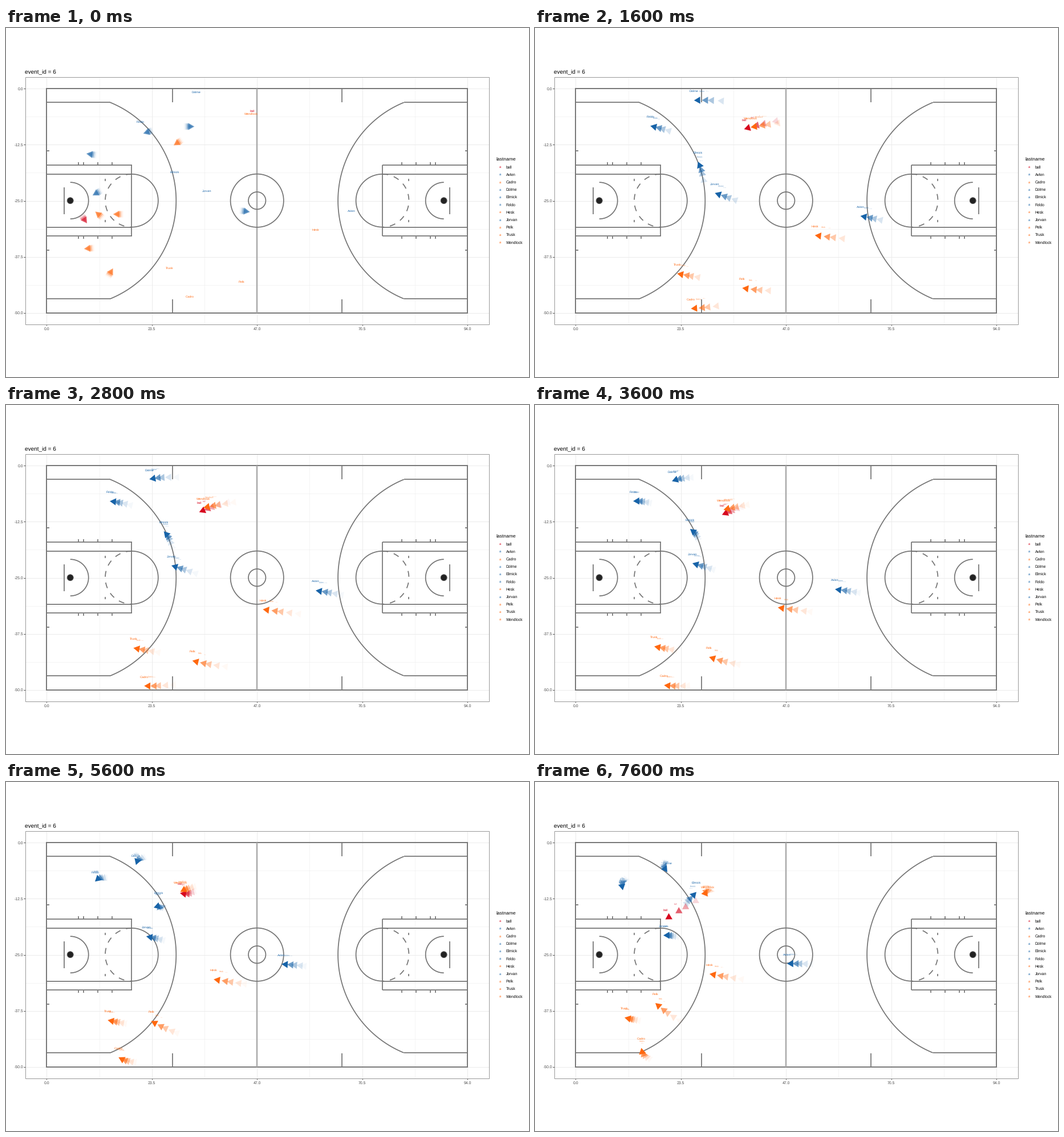
These frames come from a looping animation (917 px wide and 611 px high, 8 s). A matplotlib script:

```python
import numpy as np
import matplotlib.pyplot as plt
from matplotlib.animation import FuncAnimation
from matplotlib.collections import PolyCollection
from matplotlib.colors import to_rgba
from matplotlib.patches import Arc, Circle, Rectangle

W, H, DPI = 917, 611, 100
FRAMES, INTERVAL, WAKE = 20, 400, 4
RED, BLUE, ORANGE = "#d7081f", "#1763a8", "#ff680f"
COURT = "#737373"
MID_X, MID_Y = 440.2, 302.2
RADIUS = 7.2          # centre to tip of a marker
LABEL_RISE = 15.6
LABEL_PX = 5.5
DRIFT = 2.5           # speed of the markers left from the play before

plt.rcParams["font.family"] = "Liberation Sans"
plt.rcParams["text.hinting"] = "none"

TICKS = np.floor(2.59 * np.arange(FRAMES) + 0.1)
END_TICK, PASS_TICK = TICKS[-1], 36


def px(size):
    return size * 72 / DPI


def curve(points, u):
    """Polynomial through evenly timed points, with u running from 0 to 1."""
    degree = len(points) - 1
    return np.polyval(np.polyfit(np.linspace(0, 1, degree + 1), points, degree), u[:, None])


def run(*points):
    return curve(points, TICKS / END_TICK)


def ball_path():
    """Dribbled along a bend, then passed in a straight line."""
    release, end = (305, 194.5), (228.5, 240.5)
    dribble = curve([(432, 161), (358, 180), (326, 193), release], TICKS / PASS_TICK)
    thrown = curve([release, end], (TICKS - PASS_TICK) / (END_TICK - PASS_TICK))
    return np.where(TICKS[:, None] < PASS_TICK, dribble, thrown)


# Name, colour, path, then x, y and heading at the end of the play before
MOVERS = [
    ("ball", RED, ball_path(), (138, 336, 56)),
    ("Avlen", BLUE, run((606, 336), (521, 322), (442, 318)), (420.5, 321, 8)),
    ("Cadro", ORANGE, run((322, 486.5), (222, 490), (186.5, 465.5)), (184, 427, 300)),
    ("Dolme", BLUE, run((333, 128), (256, 129), (229, 142), (232, 158)), (323, 172.5, 0)),
    ("Elmick", BLUE, run((296, 268.5), (278.5, 223), (267, 212.5), (283, 192.5)), (148, 221, 188)),
    ("Feldo", BLUE, run((235, 180), (169.5, 168.5), (154, 189.5)), (247.5, 182.5, 162)),
    ("Hesk", ORANGE, run((543, 369), (418.5, 353.5), (306, 336)), (195, 326, 180)),
    ("Jorvan", BLUE, run((352, 301.5), (272, 276), (225, 268.5)), (158, 289.5, 150)),
    ("Pelk", ORANGE, run((413, 460), (299, 439), (211, 387)), (144, 386, 175)),
    ("Trusk", ORANGE, run((286.5, 436.5), (205, 422), (157, 412.5)), (162, 326, 220)),
    ("Wendlock", ORANGE, run((430, 166), (326.5, 184.5), (303, 200.5)), (300, 201.5, 147)),
]


def fade(age):
    return (1 - age / (WAKE + 1)) ** 2


def triangle(center, heading):
    a = heading + np.arange(3) * 2 * np.pi / 3
    return center + RADIUS * np.column_stack([np.cos(a), np.sin(a)])


def marker(path, before, step):
    """Triangle of one mover: its tip is on the path and points along it."""
    if step < 0:
        x, y, degrees = before
        heading = np.radians(degrees)
        back = (step + 1) * DRIFT
        return triangle((x + back * np.cos(heading), y + back * np.sin(heading)), heading)
    dx, dy = path[step] - path[step - 1]
    heading = np.arctan2(dy, dx)
    tip = RADIUS * np.array([np.cos(heading), np.sin(heading)])
    return triangle(path[step] - tip, heading)


fig = plt.figure(figsize=(W / DPI, H / DPI), dpi=DPI, facecolor="white")
ax = fig.add_axes([0, 0, 1, 1])
ax.set(xlim=(0, W), ylim=(H, 0))
ax.axis("off")


def line(x, y, color=COURT, width=1.7, **kw):
    ax.plot(x, y, color=color, lw=px(width), solid_capstyle="butt", **kw)


def arc(x, radius, start, end, **kw):
    a = np.radians(np.linspace(start, end, 120))
    line(x + radius * np.cos(a), MID_Y + radius * np.sin(a), **kw)


def write(x, y, s, size, color="black", ha="left"):
    return ax.text(x, y, s, fontsize=px(size), color=color, ha=ha, va="center_baseline")


def draw_panel():
    left, right, top, bottom = 33.5, 846.5, 85.5, 518.5
    for i in range(9):
        x, y = 71.4 + i * 92.2, 106.4 + i * 49.03
        width = 0.5 if i % 2 else 1
        line([x, x], [top, bottom], "#ebebeb", width)
        line([left, right], [y, y], "#ebebeb", width)
        if i % 2 == 0:
            line([x, x], [bottom, bottom + 2.8], "#333333", 0.9)
            line([left - 2.8, left], [y, y], "#333333", 0.9)
            write(x, 526.2, f"{i * 11.75:.1f}", 6.9, "#4d4d4d", "center")
            write(30, y, f"{-i * 6.25:.1f}" if i else "0.0", 6.9, "#4d4d4d", "right")
    ax.add_patch(Rectangle((left, top), right - left, bottom - top, fill=False,
                           ec="#999999", lw=px(1), zorder=3))
    write(33, 76.3, "event_id = 6", 10.05)


def draw_half(side):
    """One end of the court; side is 1 for the left, -1 for the right."""
    def fx(x):
        return x if side == 1 else 2 * MID_X - x

    def seg(x0, y0, x1, y1):
        line([fx(x0), fx(x1)], [y0, y1])

    turn = 0 if side == 1 else 180
    for s in (-1, 1):
        def dy(d):
            return MID_Y + s * d
        seg(71.3, dy(171.8), 182.6, dy(171.8))
        seg(291.7, dy(196), 291.7, dy(172.6))
        seg(71.3, dy(62.1), 220.6, dy(62.1))
        seg(71.3, dy(46.3), 220.6, dy(46.3))
        seg(71.3, dy(86.8), 75.5, dy(86.8))
        seg(174, dy(34.2), 174, dy(38.2))
        for x in (127, 136.3, 161, 186):
            seg(x, dy(62.5), x, dy(66.8))
    seg(220, MID_Y - 62.1, 220, MID_Y + 62.1)
    seg(102.3, 279, 102.3, 326)
    reach = np.degrees(np.arctan2(171.8, 70))
    arc(fx(112.7), 185.6, turn - reach, turn + reach)
    arc(fx(112.7), 32, turn - 90, turn + 90)
    arc(fx(220.4), 46.4, turn - 90, turn + 90)
    arc(fx(220.4), 46.4, -90, -90 - side * 180, dashes=(6, 6), dash_capstyle="butt")
    ax.add_patch(Circle((fx(112.7), MID_Y), 5.4, fc="#222222", ec="#555555", lw=px(1), zorder=2.5))


def draw_court():
    ax.add_patch(Rectangle((71.2, 106.2), 738, 392.6, fill=False, ec=COURT, lw=px(1.9), zorder=2))
    line([MID_X, MID_X], [106, 499], "#a8a8a8", 2.4)
    for side in (1, -1):
        draw_half(side)
    for radius in (15.2, 46.6):
        ax.add_patch(Arc((MID_X, MID_Y), 2 * radius, 2 * radius, ec=COURT, lw=px(1.7), zorder=2))


def draw_legend():
    write(859, 228.6, "lastname", 8.5)
    for i, (name, color, *_) in enumerate(MOVERS):
        y = 243 + i * 13.2
        write(866, y, "a", 5.6, color, "center")
        write(876.7, y, name, 6.8)


draw_panel()
draw_court()
draw_legend()

markers = PolyCollection([], linewidths=0, zorder=4)
ax.add_collection(markers, autolim=False)
labels = {}
for age in (2, 1, 0):
    for name, color, *_ in MOVERS:
        label = write(0, 0, name, LABEL_PX * fade(age), color, "center")
        label.set(alpha=fade(age), va="center", zorder=5)
        labels[age, name] = label


def update(frame):
    shapes, colors = [], []
    for age in range(WAKE, -1, -1):
        step = frame - age
        for name, color, path, before in MOVERS:
            # No heading is known yet on the first step, so it has no marker
            if step != 0:
                shapes.append(marker(path, before, step))
                colors.append(to_rgba(color, fade(age)))
            if (age, name) in labels:
                label = labels[age, name]
                label.set_visible(step >= 0)
                label.set_position(path[max(step, 0)] - (0, LABEL_RISE))
    markers.set_verts(shapes)
    markers.set_facecolor(colors)
    return [markers, *labels.values()]


anim = FuncAnimation(fig, update, frames=FRAMES, interval=INTERVAL, repeat=True, repeat_delay=0)
plt.show()
```
